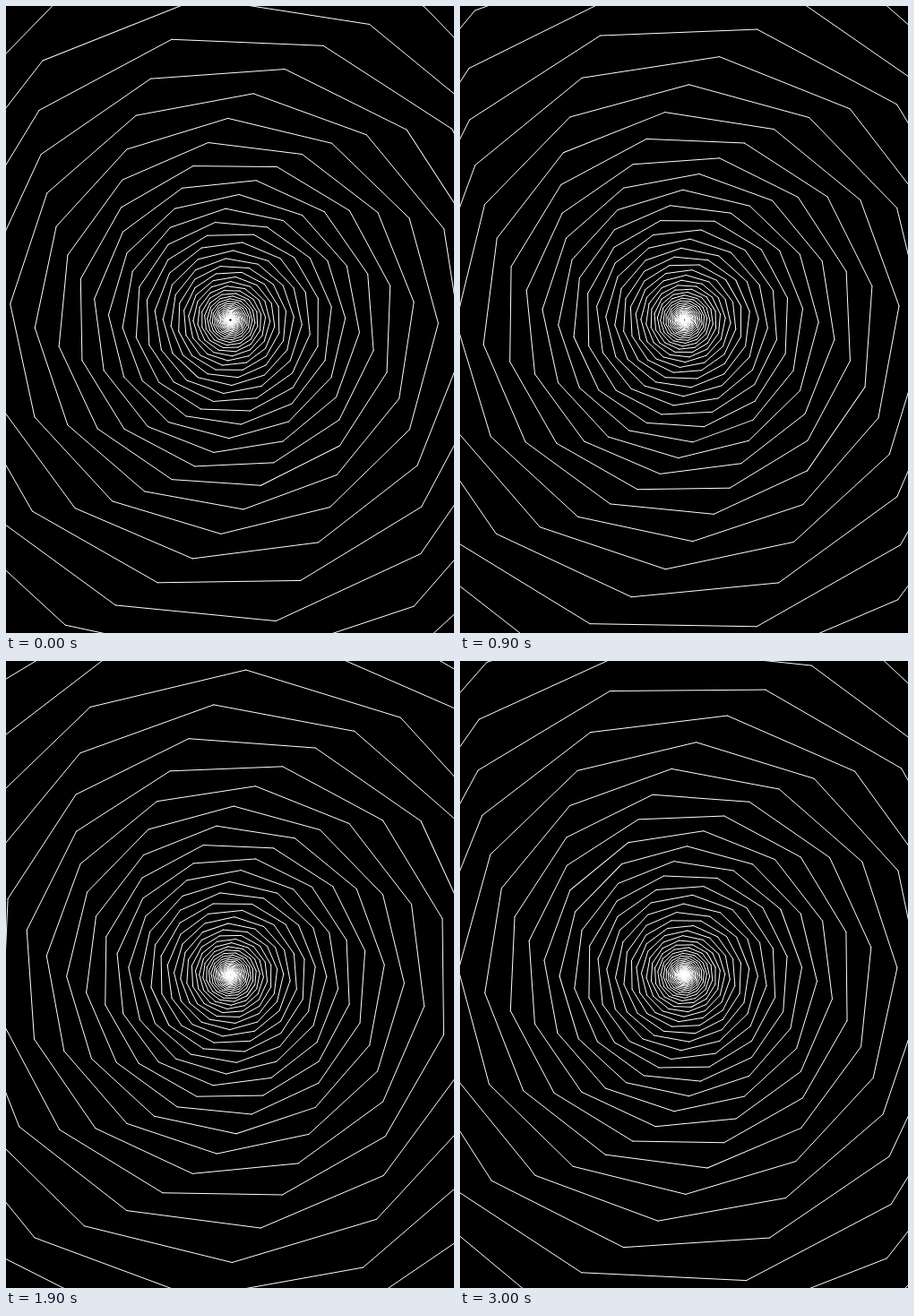
Animation, 500 px wide and 700 px high, one loop 3100 ms. Source, as an HTML page without scripts:

```html
<!DOCTYPE html>
<html lang="en">
<head>
<meta charset="utf-8">
<title>Receding spiral</title>
<style>
  @property --tick { syntax: "<number>"; inherits: false; initial-value: 0; }

  html, body { margin: 0; width: 100%; height: 100%; overflow: hidden; background: #000; }
  svg { display: block; width: 500px; height: 700px; }

  path {
    fill: none;
    stroke: #fff;
    stroke-width: 1;
    stroke-linecap: round;
    vector-effect: non-scaling-stroke;
  }

  /* Move a piece --n steps inward along the spiral. */
  use {
    --n: 0;
    transform: rotate(calc(var(--n) * -30.539deg)) scale(pow(.99, var(--n)));
  }

  /* Perspective: size falls as 1 / distance, one tick every 100 ms. */
  .spiral {
    transform: scale(calc(16.36 / (16.36 + var(--tick))));
    animation: recede 3.1s steps(31) infinite;
  }
  @keyframes recede { from { --tick: 0; } to { --tick: 31; } }
</style>
</head>
<body>
<svg viewBox="-250.5 -350.5 500 700">
  <defs>
    <path id="s1" d="M0-1474.4L-741.67-1257.19"/>
    <g id="s2"><use href="#s1"/><use href="#s1" style="--n:1"/></g>
    <g id="s4"><use href="#s2"/><use href="#s2" style="--n:2"/></g>
    <g id="s8"><use href="#s4"/><use href="#s4" style="--n:4"/></g>
    <g id="s16"><use href="#s8"/><use href="#s8" style="--n:8"/></g>
    <g id="s32"><use href="#s16"/><use href="#s16" style="--n:16"/></g>
    <g id="s64"><use href="#s32"/><use href="#s32" style="--n:32"/></g>
    <g id="s128"><use href="#s64"/><use href="#s64" style="--n:64"/></g>
  </defs>
  <g class="spiral">
    <g transform="rotate(310.1)">
      <use href="#s128"/>
      <use href="#s128" style="--n:128"/>
      <use href="#s128" style="--n:256"/>
      <use href="#s128" style="--n:384"/>
      <use href="#s128" style="--n:512"/>
      <use href="#s32" style="--n:640"/>
    </g>
  </g>
</svg>
</body>
</html>
```
